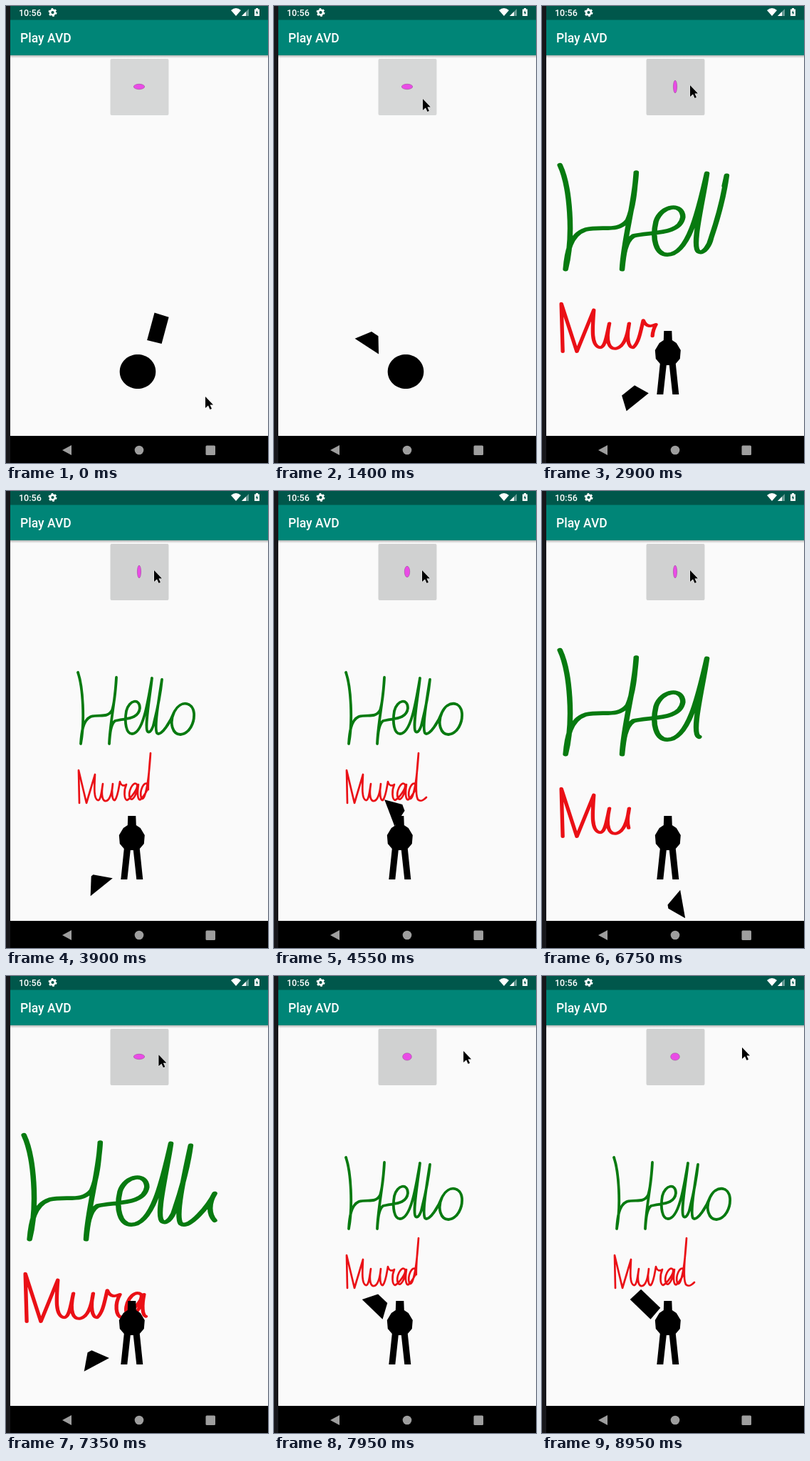
An HTML page for the animation above (9000 ms loop, 368x640 px).

```html
<!DOCTYPE html>
<html lang="en">
<head>
<meta charset="utf-8">
<title>Play AVD</title>
<style>
  html, body { margin: 0; width: 100%; height: 100%; overflow: hidden; background: #fafafa; }
  svg { display: block; width: 368px; height: 640px; }
  text { font-family: Roboto, sans-serif; font-weight: 500; fill: #fff; }
  .pen { fill: none; stroke-linecap: round; stroke-linejoin: round; }
</style>
</head>
<body>
<svg viewBox="0 0 368 640">
  <defs>
    <linearGradient id="shade" x2="0" y2="1">
      <stop stop-color="#b4b4b4"/>
      <stop offset="1" stop-color="#fafafa"/>
    </linearGradient>
  </defs>
  <rect width="368" height="640" fill="#fafafa"/>
  <rect y="69" width="368" height="4" fill="url(#shade)"/>
  <rect y="19" width="368" height="50" fill="#008577"/>
  <rect width="368" height="19.5" fill="#00574b"/>
  <rect y="602" width="368" height="38"/>
  <rect width="6" height="640" fill="#17171b"/>

  <text x="18" y="14" font-size="12.5">10:56</text>
  <text x="20" y="51" font-size="17.5">Play AVD</text>
  <g fill="#fff">
    <circle cx="65.5" cy="9" r="3.4" fill="none" stroke="#fff" stroke-width="2.6"/>
    <circle cx="65.5" cy="9" r="5" fill="none" stroke="#fff" stroke-width="2" stroke-dasharray="2.6 2.636"/>
    <path d="M316 6Q323 0 330 6L323 14Z"/>
    <path d="M341 4V14H331Z" opacity=".4"/>
    <path d="M337 8V14H331Z"/>
    <path d="M349 4.5H351V3H354V4.5H356V14H349Z"/>
  </g>
  <path d="M352.8 6L350.6 9.8H352.2V12.6L354.4 8.8H352.8Z" fill="#00574b"/>
  <g fill="#9e9e9e">
    <path d="M79 622L92 615V629Z"/>
    <circle cx="187" cy="622" r="6.3"/>
    <rect x="280.5" y="615.5" width="13.5" height="13.5" rx="1.5"/>
  </g>

  <rect id="button" x="146.5" y="74" width="82" height="79" rx="2"/>
  <ellipse id="mouth" cx="187" cy="113" fill="#ea4be6" stroke="#9c4a9a" stroke-width=".6"/>

  <path id="hello" class="pen" pathLength="1" stroke="#077a10" stroke-width="3.8" d="M101 254
    C108 274 111 322 105 354C106 338 108 321 119 316C131 312 142 319 149 307C153 295 154 277 155 261
    C154 290 146 325 145 354C146 340 147 327 153 322C166 318 186 321 188 304C188 290 173 292 169 308
    C166 325 169 340 177 340C192 340 199 298 205 262C202 290 194 332 199 337C203 340 207 330 208 324
    C212 308 217 284 219 264C214 295 208 332 212 339C218 345 232 321 236 310
    C229 325 234 341 245 341C258 340 265 324 264 311C262 294 244 293 236 310"/>
  <path id="name" class="pen" pathLength="1" stroke="#ea1016" stroke-width="2.7" d="M103 437
    L102 391L113 437L125 397C124 415 123 431 129 433C133 434 134 422 136 410
    C133 428 136 435 141 434C147 432 149 420 150 410C148 422 149 434 153 433C157 428 158 418 160 407
    C162 414 166 413 169 411C165 420 166 432 170 433C176 430 186 416 184 411C178 405 171 422 174 430
    C178 436 184 424 186 411C184 424 185 434 189 432C193 428 202 416 199 411C194 405 187 420 190 430
    C194 436 200 416 203 367C200 400 198 425 202 432C206 436 210 433 214 429"/>

  <polygon id="figure"/>
  <polygon id="satellite"/>
  <path id="pointer" d="M0 0V16L4 12.5L6.5 18L9 17L6.5 11.5H11Z" stroke="#fff" paint-order="stroke"/>
</svg>
<script>
const LOOP = 9000;
const RUNS = [-20, 2080, 5015];   // satellite, mouth and figure restart
const WRITINGS = [1750, 5800];    // handwriting restarts
const WRITE_TIME = 2250;

const el = id => document.getElementById(id);
const set = (id, attrs) => Object.entries(attrs).forEach(([k, v]) => el(id).setAttribute(k, v));
const mix = (a, b, k) => a + (b - a) * k;
const clamp = k => Math.min(1, Math.max(0, k));
const ease = k => 0.5 - 0.5 * Math.cos(Math.PI * clamp(k));
const decelerate = k => 1 - (1 - k) ** 2;
const sinceLast = (starts, t) => t - Math.max(...starts.filter(s => s <= t));

// Right half of the standing figure, as offsets from its axis; the left half mirrors it.
const AXIS = 176.8;
const half = [[5.5,455],[6,468],[12,472],[18,482],[17,494],[11,501],[15.5,544],[6.5,544],[2,503]];
const person = [...half.map(([x, y]) => [AXIS + x, y]),
                ...half.map(([x, y]) => [AXIS - x, y]).reverse()];

// Blend of a circle (0) and the standing figure (1).
function figurePoints(k) {
  const sub = 4, count = person.length * sub;
  return Array.from({ length: count }, (_, i) => {
    const n = Math.floor(i / sub), f = i % sub / sub;
    const p = person[n], q = person[(n + 1) % person.length];
    const a = (i / count * 360 - 80) * Math.PI / 180;
    return [mix(185 + 25.3 * Math.cos(a), mix(p[0], q[0], f), k),
            mix(512 + 24 * Math.sin(a), mix(p[1], q[1], f), k)];
  }).join(' ');
}

// One turn takes 500 ms while the rectangle shrinks to a triangle and back in 4 s.
function drawSatellite(run) {
  const side = 19.5 * Math.abs(1 - run / 2000 % 2);
  set('satellite', {
    points: `0,-46.5 0,-86.5 21,${-66.5 - side} 21,${-66.5 + side}`,
    transform: `translate(186 513) rotate(${run / 500 * 360})`
  });
}

function drawMouth(run) {
  const tall = clamp(0.5 + 3 * (Math.cos((run - 690) / 1000 * 2 * Math.PI) - 0.1));
  set('mouth', { rx: mix(7.7, 2.6, tall), ry: mix(3.7, 8.8, tall) });
}

function drawPen(id, progress, big, pivotY) {
  el(id).style.display = progress > 0 ? '' : 'none';
  set(id, {
    'stroke-dasharray': progress < 1 ? `${progress} 2` : 'none',
    transform: `translate(178 ${pivotY}) scale(${1 + 0.985 * big} ${1 + 0.46 * big}) translate(-178 ${-pivotY})`
  });
}

// Pointer stops: time, x, y.
const stops = [[0,280,547],[1350,209,131],[1700,208,111],[7200,208,111],[7900,266,105],[8900,281,100]];

function drawPointer(t) {
  const i = stops.findIndex(s => s[0] > t);
  const b = stops[i < 0 ? stops.length - 1 : i], a = i < 0 ? b : stops[i - 1];
  const k = ease((t - a[0]) / (b[0] - a[0] || 1));
  set('pointer', { transform: `translate(${mix(a[1], b[1], k)} ${mix(a[2], b[2], k)})` });
}

function draw(t) {
  const run = sinceLast(RUNS, t);
  const writing = Math.max(0, sinceLast(WRITINGS, t));
  const started = t >= WRITINGS[0];
  const progress = started ? clamp(writing / WRITE_TIME) : 0;
  const big = 1 - ease((writing - 1700) / 450);

  drawPen('hello', decelerate(progress), big, 322);
  drawPen('name', progress, big, 335);
  set('figure', { points: figurePoints(t < RUNS[1] ? 0 : ease(run / 500)) });
  drawSatellite(run);
  drawMouth(run);
  set('button', { fill: started ? '#d0d1d1' : '#d6d7d7' });
  drawPointer(t);
}

const begin = performance.now();
function tick() {
  draw((performance.now() - begin) % LOOP);
  requestAnimationFrame(tick);
}
tick();
</script>
</body>
</html>
```
